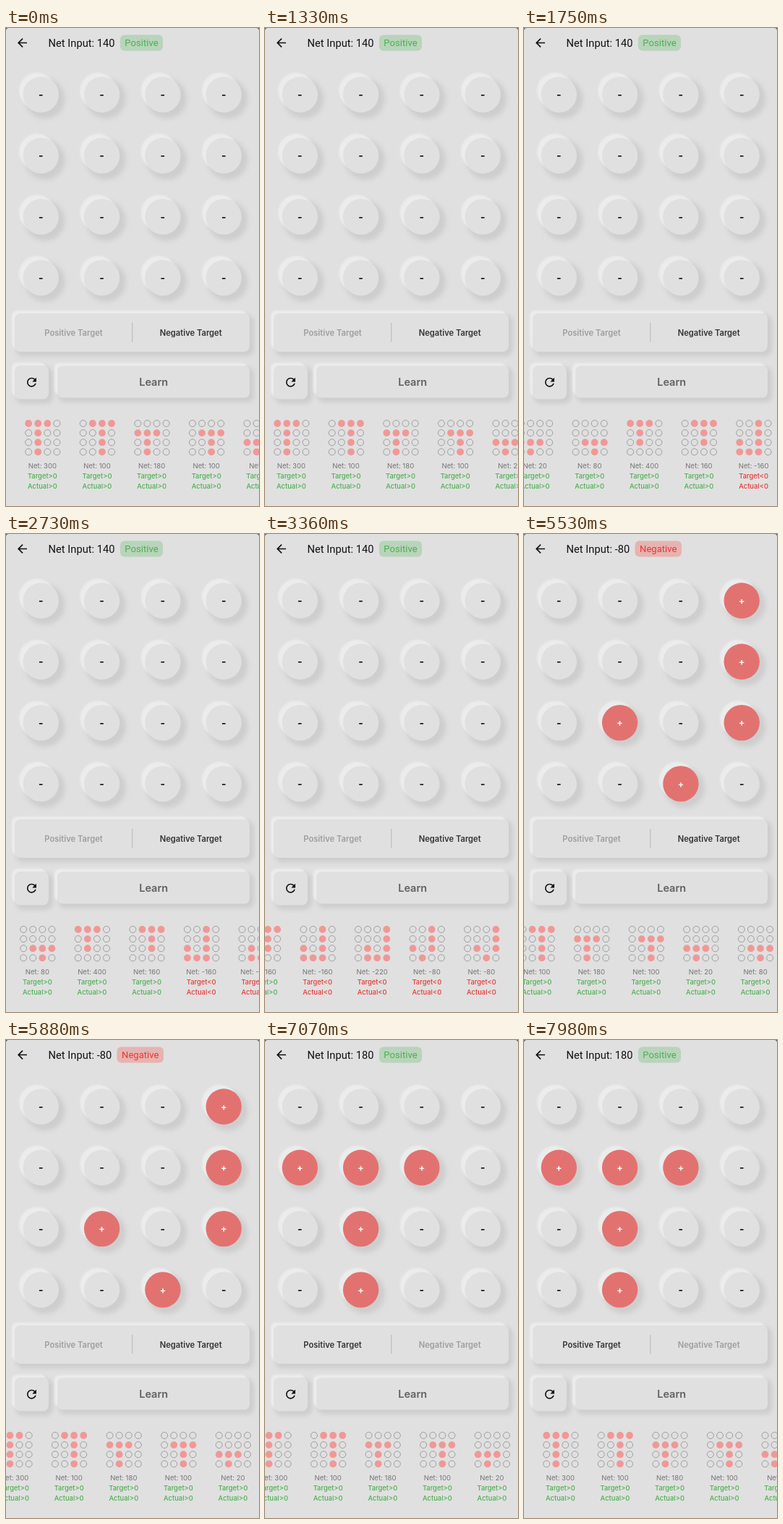
An HTML page that plays this animation: 350x660 px, repeating every 8 s.

```html
<!DOCTYPE html>
<html lang="en">
<head>
<meta charset="utf-8">
<title>Pattern trainer</title>
<style>
  html, body { margin: 0; width: 100%; height: 100%; overflow: hidden; background: #e0e0e0; }
  svg { display: block; width: 350px; height: 660px; }
  text { font-family: Inter, sans-serif; }
  .title, .chip { font-family: Roboto, sans-serif; }
  .title { font-size: 14.7px; }
  .chip { font-size: 13.1px; }
  .target { font-size: 11.2px; font-weight: 600; }
  .learn { font-size: 14.5px; font-weight: 600; fill: #616161; }
  .net { font-size: 9.6px; fill: #757575; }
  .verdict { font-size: 9.4px; font-weight: 500; }
  .mid { text-anchor: middle; }
</style>
</head>
<body>
<svg id="stage" viewBox="0 0 350 660">
  <defs>
    <filter id="soft" x="-30%" y="-30%" width="160%" height="160%"><feGaussianBlur stdDeviation="1.2"/></filter>
    <filter id="wide" x="-40%" y="-40%" width="180%" height="180%"><feGaussianBlur stdDeviation="2.5"/></filter>
  </defs>
  <rect width="350" height="20" fill="#555"/>
  <rect width="350" height="670" rx="4" fill="#e0e0e0"/>
</svg>
<script>
const LOOP = 8000, STEP = 70;
const GREEN = '#4caf50', RED = '#e53935';
const PITCH = 75.6, FIRST_X = 50.7, END = 582.6;
const stage = document.getElementById('stage');

function add(parent, tag, attrs = {}, text = '') {
  const node = document.createElementNS('http://www.w3.org/2000/svg', tag);
  for (const key in attrs) node.setAttribute(key, attrs[key]);
  node.textContent = text;
  parent.append(node);
  return node;
}
const label = (parent, cls, x, y, text, fill = '#111') =>
  add(parent, 'text', { class: cls, x, y, fill }, text);

// A raised surface: dark shadow to the lower right, light to the upper left.
function raised(x, y, w, h, r, depth) {
  const layer = (shift, grow, fill, filter) => add(stage, 'rect', {
    x: x + shift - grow, y: y + shift - grow, width: w + 2 * grow, height: h + 2 * grow,
    rx: r + grow, fill, ...(filter && { filter: `url(#${filter})` })
  });
  layer(depth, depth * 1.1, '#dadada', 'wide');
  layer(depth, depth * 0.3, '#cecece', 'wide');
  layer(-depth, 0, '#ececec', 'soft');
  return layer(0, 0, '#e0e0e0');
}

function icon(path, cx, cy) {
  add(stage, 'path', { d: path, fill: '#111', transform: `translate(${cx} ${cy}) scale(.81) translate(-12 -12)` });
}

// Header
icon('M20 11H7.83l5.59-5.59L12 4l-8 8 8 8 1.41-1.41L7.83 13H20v-2z', 22.5, 20.5);
const title = label(stage, 'title', 58.6, 25.6, '');
const chip = add(stage, 'rect', { y: 9.5, height: 22, rx: 6 });
const chipText = label(stage, 'chip mid', 0, 25, '');

// Input grid
const cells = Array.from({ length: 16 }, (_, i) => {
  const x = 48.3 + (i % 4) * 84.3, y = 92 + (i >> 2) * 84.3;
  const face = raised(x - 24.7, y - 24.7, 49.4, 49.4, 24.7, 5.5);
  return { face, y, sign: add(stage, 'text', { class: 'mid', x, 'font-weight': 700 }) };
});

// Target switch and action buttons
raised(12, 394, 325, 53, 8, 4);
const positive = label(stage, 'target mid', 93.5, 424.5, 'Positive Target');
const negative = label(stage, 'target mid', 255.7, 424.5, 'Negative Target');
add(stage, 'rect', { x: 174.3, y: 407, width: 1, height: 26.5, fill: '#b8b8b8' });
raised(12, 466, 47, 46.5, 8, 4);
icon('M17.65 6.35C16.2 4.9 14.21 4 12 4c-4.42 0-7.99 3.58-7.99 8s3.57 8 7.99 8c3.73 0 6.84-2.55 7.73-6h-2.08c-.82 2.33-3.04 4-5.65 4-3.31 0-6-2.69-6-6s2.69-6 6-6c1.66 0 3.14.69 4.22 1.78L13 11h7V4l-2.35 2.35z', 35.5, 489.2);
raised(71, 466.5, 266, 44, 7, 4);
label(stage, 'learn mid', 204.2, 494.4, 'Learn', '#616161');

// Sample strip: net value and 4x4 pattern, rows separated by spaces
const samples = [
  [300, 'xxx. .x.. .x.. .x..'], [100, '.xxx ..x. ..x. ..x.'],
  [180, '.... xxx. .x.. .x..'], [100, '.... .xxx ..x. ..x.'],
  [20, '.... .... xxx. .x..'], [80, '.... .... .xxx ..x.'],
  [400, 'xxx. .x.. .x.. ....'], [160, '.xxx ..x. ..x. ....'],
  [-160, '..x. ..x. x.x. xxx.'], [-220, '...x ...x .x.x .xxx'],
  [-80, '..x. ..x. x.x. .x..'], [-80, '...x ...x .x.x ..x.']
].map(([net, rows]) => ({ net, dots: rows.replace(/ /g, '') }));

const strip = add(stage, 'g');
for (const [i, sample] of samples.entries()) {
  const item = add(strip, 'g', { transform: `translate(${FIRST_X + i * PITCH} 0)` });
  sample.touch = add(item, 'rect', { x: -PITCH / 2, y: 532, width: PITCH, height: 115, fill: '#000', 'fill-opacity': 0 });
  [...sample.dots].forEach((dot, k) => {
    const on = dot === 'x';
    add(item, 'circle', {
      cx: (k % 4 - 1.5) * 13.1 + 0.1, cy: 546 + (k >> 2) * 13.1, r: on ? 4.9 : 4.5,
      fill: on ? '#f09896' : 'none', stroke: on ? 'none' : '#9e9e9e'
    });
  });
  const sign = sample.net > 0 ? '>0' : '<0', color = sample.net > 0 ? GREEN : RED;
  label(item, 'net mid', -0.3, 608.3, 'Net: ' + sample.net, '#757575');
  label(item, 'verdict mid', -0.3, 622.3, 'Target' + sign, color);
  label(item, 'verdict mid', -0.3, 636.3, 'Actual' + sign, color);
}

// Strip scrolling: start, end, from, to, ease-out power
const drags = [
  [1190, 1330, 0, 14, 1], [1330, 2030, 14, 378, 2.4],
  [2660, 2800, 378, 392, 1], [2800, 3360, 392, END, 2],
  [4970, 5110, END, 568.6, 1], [5110, 5880, 568.6, 38.8, 2.576],
  [7210, 7350, 38.8, 30, 1], [7350, 7980, 30, 0, 2.4]
];
function scrollAt(t) {
  let pos = 0;
  for (const [start, end, from, to, power] of drags) {
    if (t < start) break;
    const left = 1 - Math.min(1, (t - start) / (end - start));
    pos = to + (from - to) * left ** power;
  }
  return pos;
}

const blank = { net: 140, dots: '.'.repeat(16) };
const states = [
  { at: 0, sample: blank, wantPositive: false },
  { at: 4480, sample: samples[11], wantPositive: false },
  { at: 6510, sample: samples[2], wantPositive: true }
];
const touches = [[4340, 4550, samples[11]], [6440, 6580, samples[2]]];

function set(node, attrs) {
  for (const key in attrs) node.setAttribute(key, attrs[key]);
}

let shown;
function show(state) {
  if (state === shown) return;
  shown = state;
  const { net, dots } = state.sample, up = net > 0;
  title.textContent = 'Net Input: ' + net;
  set(chip, { x: up ? 158 : 153.5, width: up ? 59 : 64.5, fill: up ? '#b8d4ba' : '#e7b3b0' });
  chipText.textContent = up ? 'Positive' : 'Negative';
  set(chipText, { x: up ? 187.5 : 185.8, fill: up ? GREEN : RED });
  cells.forEach(({ face, sign, y }, i) => {
    const on = dots[i] === 'x';
    set(face, { fill: on ? '#e27270' : '#e0e0e0' });
    set(sign, { y: y + (on ? 4.6 : 4.9), fill: on ? '#fff' : '#111', 'font-size': on ? 12.5 : 14 });
    sign.textContent = on ? '+' : '-';
  });
  set(positive, { fill: state.wantPositive ? '#333' : '#9e9e9e' });
  set(negative, { fill: state.wantPositive ? '#9e9e9e' : '#333' });
}

const began = performance.now();
function draw() {
  const t = Math.floor(((performance.now() - began) % LOOP) / STEP) * STEP;
  show(states.findLast(s => s.at <= t));
  strip.setAttribute('transform', `translate(${-scrollAt(t)} 0)`);
  for (const [start, end, sample] of touches)
    sample.touch.setAttribute('fill-opacity', t >= start && t < end ? 0.05 : 0);
  requestAnimationFrame(draw);
}
draw();
</script>
</body>
</html>
```
